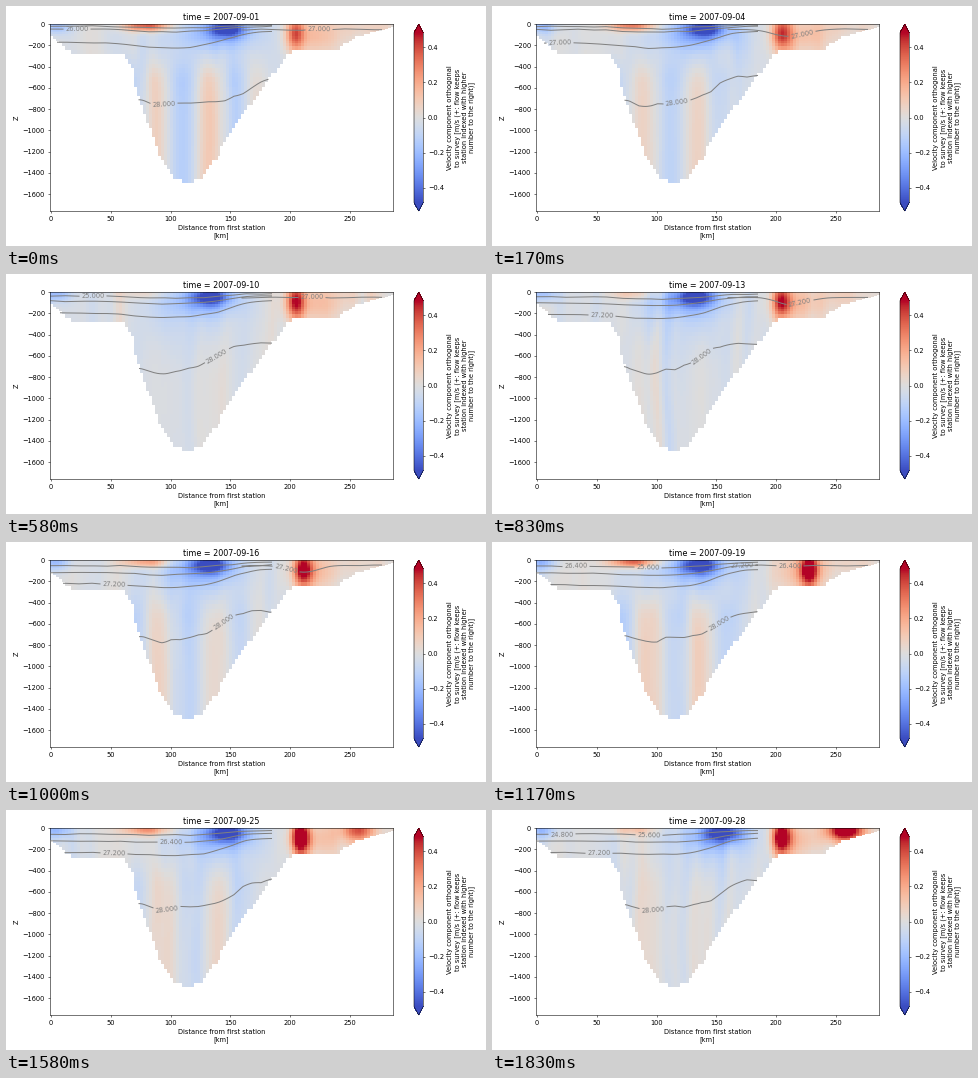
Recreate the animation shown at these times as a matplotlib script. Size 480 by 240 pixels, loop 2.01 s.

```python
import numpy as np
import matplotlib.pyplot as plt
from matplotlib.animation import FuncAnimation

W, H, DPI = 480, 240, 48
LEFT, RIGHT, TOP, BOTTOM = 43.7, 387, 18.2, 205
STEP, LOOP = 10, 2010
STARTS = [0, 170, 420, 580, 830, 1000, 1170, 1420, 1580, 1830]

# Density labels per survey: which contour, where along it, text
DEEP, MID, UPPER, SURFACE, SHELF = range(5)
LABELS = [
    [(DEEP, 158, "28.000"), (UPPER, 71, "26.000"), (SHELF, 313, "27.000")],
    [(DEEP, 185, "28.000"), (MID, 68, "27.000"), (SHELF, 310, "27.000")],
    [(DEEP, 212, "28.000"), (MID, 68, "27.000"), (SURFACE, 84, "25.000")],
    [(DEEP, 211, "28.000"), (SURFACE, 87, "25.000"), (SHELF, 306, "27.000")],
    [(DEEP, 210, "28.000"), (MID, 110, "27.200"), (SHELF, 308, "27.200")],
    [(DEEP, 218, "28.000"), (MID, 108, "27.200"), (SHELF, 280, "27.200")],
    [(DEEP, 227, "28.000"), (SURFACE, 84, "26.400"), (SURFACE, 156, "25.600"),
     (SHELF, 250, "27.200"), (SHELF, 298, "26.400")],
    [(DEEP, 161, "28.000"), (SURFACE, 80, "25.600"), (UPPER, 165, "26.400"),
     (SHELF, 250, "27.200")],
    [(DEEP, 161, "28.000"), (MID, 108, "27.200"), (UPPER, 165, "26.400")],
    [(DEEP, 161, "28.000"), (MID, 107, "27.200"), (SURFACE, 157, "25.600"),
     (SURFACE, 70, "24.800")],
]


def km(x):
    return (x - 44.9) / 1.196


def depth(y):
    return (TOP - y) / 0.1062


def rect(left, top, right, bottom):
    return [left / W, 1 - bottom / H, (right - left) / W, (bottom - top) / H]


def ease(t):
    t = np.clip(t, 0, 1)
    return t * t * (3 - 2 * t)


def bump(x, centre, width):
    return np.exp(-((x - centre) / width) ** 2 / 2)


def step(x, centre, width):
    return 1 / (1 + np.exp((centre - x) / width))


def wiggle(rng, x, gap, size):
    knots = np.arange(30, 410, gap)
    return np.interp(x, knots, rng.normal(0, size, len(knots)))


def seabed(x):
    xs = [43, 66, 116, 125, 130, 152, 165, 180, 194, 209, 230, 256, 285, 330, 346, 364, 387]
    ys = [28, 48, 49, 58, 85, 147, 170, 177, 171, 152, 119, 80, 45, 43, 32, 26, 20]
    return np.interp(x, xs, ys)


# Grid cells: even columns, layers that thicken with depth
edges = np.linspace(LEFT, RIGHT, 116)
layers = TOP + np.concatenate([np.arange(0, 8, 1), np.arange(8, 24, 2.3),
                               np.arange(26, 195, 4.6)])
rows = np.arange(TOP + 0.25, BOTTOM, 0.5)
layer = np.digitize(rows, layers) - 1
X, Y = np.meshgrid((edges[1:] + edges[:-1]) / 2,
                   (layers[layer] + layers[layer + 1]) / 2)
land = Y - 1 > seabed(X)


def velocity(k):
    rng = np.random.default_rng(k)
    pulse = np.cos(2 * np.pi * k / 6.5)
    jet = 203 + 1.1 * (k - 4) ** 2
    eddy = 289 + 31 * np.exp(-((k - 6.4) / 1.2) ** 2)
    outer = 0.6 * ease((k - 7) / 2)

    def patch(x, y, w, h):
        return bump(X, x, w) * bump(Y, y, h)

    # Deep: alternating columns and fine upright streaks
    v = wiggle(rng, X + 2 * np.sin(Y / 25 + k), 9, 0.02) - 0.015
    v += ((0.06 + 0.04 * pulse) * np.cos(2 * np.pi * (X - 203 - k) / 54)
          * ease((Y - 40) / 40) * step(250 - X, 0, 8))
    # Basin surface: warm patch, southward jet and its halo, coastal flow
    v += (0.25 + 0.17 * pulse) * patch(140, 20, 16, 4)
    v -= 0.42 * patch(jet, 23, 13, 6) + 0.17 * patch(jet - 8, 28, 26, 11)
    v -= 0.06 * patch(jet - 15, 40, 35, 25) + 0.18 * patch(50, 20, 10, 6)
    # Shelf: northward eddy, warm surroundings, late outer pulse
    v += (0.34 + 0.03 * k) * patch(eddy, 28, 6.5, 12)
    v += 0.16 * patch(308, 30, 18, 14) + 0.08 * patch(360, 22, 20, 9)
    v += outer * patch(352, 20, 12, 8)
    return np.ma.masked_where(land, v)


def contours(k):
    """Each contour as (x, y) on the stage, in the order of the label names."""
    rng = np.random.default_rng(50 + k)
    x = np.arange(125, 285, 0.5)
    middle = 207 + 38 * np.exp(-k) + 22 * ease((k - 4) / 3)
    y = (97 - 3 * bump(x, 133, 6) + 3.5 * bump(x, 157, 8)
         - 28 * step(x, middle, 10) + wiggle(rng, x, 9, 0.8))
    lines = [(x, y)]

    x = np.arange(45, 266, 0.5)
    for base in (36.5 + 6.5 * ease(k / 7), 23 + 8 * ease(k / 6), 20 + 4 * ease(k / 6)):
        sag = (1 - k / 12) * (2 + 0.2 * (base - TOP))
        y = (base + sag * bump(x, 165, 32) - 0.62 * (base - TOP) * step(x, 225, 11)
             + wiggle(rng, x, 14, 0.3))
        lines.append((x, y))

    if k < 8:
        x = np.arange(236, 376, 0.5)
        swell = 9 * np.sin(np.pi * k / 3) ** 2
        lines.append((x, 23.5 + swell * bump(x, 298, 15) + wiggle(rng, x, 14, 0.4)))
    return lines


def survey(k):
    """Velocity grid, contour path with gaps, and placed labels."""
    lines = contours(k)
    keep = [y < seabed(x) + 1 for x, y in lines]
    labels = []
    for n, at, text in LABELS[k]:
        x, y = lines[n]
        before, here, after = np.interp([at - 9, at, at + 9], x, y)
        angle = np.arctan2(before - after, 18)
        keep[n] &= abs(x - at) > 14 * np.cos(angle)
        labels.append((km(at), depth(here), np.degrees(angle), text))
    xs = np.concatenate([np.append(x, np.nan) for x, _ in lines])
    ys = np.concatenate([np.append(np.where(ok, y, np.nan), np.nan)
                         for (_, y), ok in zip(lines, keep)])
    return velocity(k), (km(xs), depth(ys)), labels


surveys = [survey(k) for k in range(len(STARTS))]

fig = plt.figure(figsize=(W / DPI, H / DPI), dpi=DPI, facecolor="white")
ax = fig.add_axes(rect(LEFT, TOP, RIGHT, BOTTOM))
extent = (km(LEFT), km(RIGHT), depth(BOTTOM), 0)
image = ax.imshow(surveys[0][0], cmap="coolwarm", vmin=-0.483, vmax=0.483,
                  extent=extent, aspect="auto", interpolation="nearest")
curves, = ax.plot([], [], color="gray", lw=1.5)
tags = [ax.text(0, 0, "", color="gray", size=10, ha="center", va="center", clip_on=True)
        for _ in range(max(map(len, LABELS)))]
ax.set_xlim(extent[:2])
ax.set_ylim(extent[2:])
ax.set_xticks(range(0, 300, 50))
ax.set_yticks(range(0, -1800, -200))
ax.set_xlabel("Distance from first station\n[km]", labelpad=5)
ax.set_ylabel("Z", labelpad=5)
title = ax.set_title("")

bar = fig.colorbar(image, cax=fig.add_axes(rect(408, TOP, 417.3, BOTTOM)),
                   extend="both", ticks=[-0.4, -0.2, 0, 0.2, 0.4])
bar.set_label("Velocity component orthogonal\nto survey [m/s (+: flow keeps\n"
              "station indexed with higher\nnumber to the right)]")


def draw(i):
    k = np.searchsorted(STARTS, i * STEP, side="right") - 1
    grid, path, labels = surveys[k]
    image.set_data(grid)
    curves.set_data(*path)
    for tag in tags:
        tag.set_text("")
    for tag, (x, y, angle, text) in zip(tags, labels):
        tag.set(position=(x, y), rotation=angle, text=text)
    title.set_text(f"time = 2007-09-{1 + 3 * k:02d}")
    return [image, curves, title, *tags]


anim = FuncAnimation(fig, draw, frames=LOOP // STEP, interval=STEP,
                     repeat=True, repeat_delay=0, blit=False)
plt.show()
```
